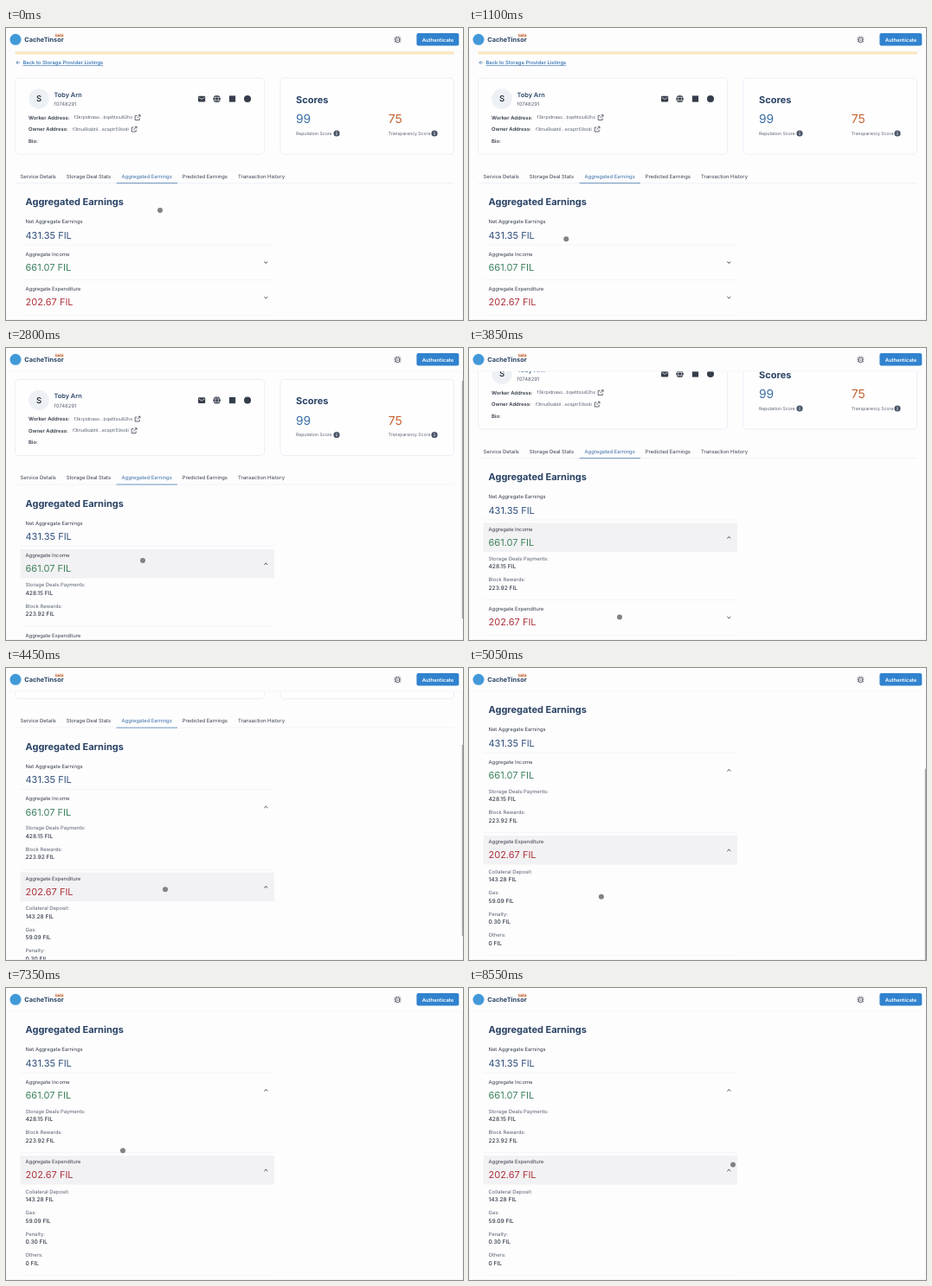
An HTML page for the animation above (8650 ms loop, 528x338 px).

```html
<!DOCTYPE html>
<html lang="en">
<head>
<meta charset="utf-8">
<title>Storage provider earnings</title>
<style>
  html, body { margin: 0; width: 100%; height: 100%; overflow: hidden; background: #fdfdfe; }
  svg { display: block; width: 528px; height: 338px; font-family: Inter, sans-serif; text-rendering: geometricPrecision; }
</style>
</head>
<body>
<svg id="stage" viewBox="0 0 528 338"></svg>
<script>
const LOOP = 8650;
const BG = '#fdfdfe', NAVY = '#2a4365', INK = '#363d4a', GREY = '#586070', BLUE = '#3a6ea5', LINE = '#e8ebf0';

// y is the optical middle of the line of text
const text = (x, y, size, fill, str, weight = 400, extra = '') =>
  `<text x="${x}" y="${y + size * 0.36}" font-size="${size}" fill="${fill}" font-weight="${weight}" ${extra}>${str}</text>`;
const rect = (x, y, w, h, fill, extra = '') =>
  `<rect x="${x}" y="${y}" width="${w}" height="${h}" fill="${fill}" ${extra}/>`;
const stroke = (d, color, width = 0.8, extra = '') =>
  `<path d="${d}" fill="none" stroke="${color}" stroke-width="${width}" ${extra}/>`;
const circle = (x, y, r, fill, extra = '') => `<circle cx="${x}" cy="${y}" r="${r}" fill="${fill}" ${extra}/>`;

const divider = y => stroke(`M16.5 ${y}H309.5`, LINE, 0.5);
const card = (x, w) => rect(x, 58, w, 88, '#fefeff', 'rx="4.4" stroke="#dfe4ee" stroke-width=".6"');
const externalLink = (x, y) =>
  stroke(`M${x - 0.5} ${y - 2}h-2.3v5h5v-2.3M${x + 0.8} ${y - 2.8}h2.2v2.2M${x + 3} ${y - 2.8}l-3.6 3.6`, INK, 0.75);
const info = x => circle(x, 122, 3.6, '#4a5568') + rect(x - 0.4, 121.4, 0.8, 2.6, '#fff') + circle(x, 120.2, 0.5, '#fff');
const score = (x, value, color, label, iconX) =>
  text(x, 105.2, 13.9, color, value) + text(x, 122, 5.13, GREY, label) + info(iconX);
const row = (id, y, label, amount, color) => `
  ${rect(16.5, y, 293.5, 33.5, '#f2f1f3', `id="${id}Hover"`)}
  ${text(22.5, y + 7, 5.87, INK, label)}
  ${text(22.5, y + 22.5, 11, color, amount)}
  <g id="${id}Chevron">${stroke('M-1.9 -.9L0 .9L1.9 -.9', INK, 1)}</g>`;
const details = (id, y, items) => `<g id="${id}Details">` + items.map(([label, amount], i) =>
  text(22.5, y + i * 24.5, 5.87, GREY, label) + text(22.5, y + 9.5 + i * 24.5, 6.6, INK, amount, 500)).join('') + '</g>';

const tabs = [[16.5, 'Service Details'], [69.7, 'Storage Deal Stats'], [133.5, 'Aggregated Earnings'],
  [203.7, 'Predicted Earnings'], [268, 'Transaction History']];

const profile = `
  ${rect(10.6, 24, 507, 6.5, '#fce6bd')}
  ${stroke('M16.3 40H11.8M13.8 38L11.8 40L13.8 42', BLUE, 0.7)}
  ${text(19.5, 40, 5.87, '#2b6cb0', 'Back to Storage Provider Listings', 500, 'text-decoration="underline"')}
  ${card(10.6, 288)}${card(317, 200.5)}
  ${circle(38, 82, 11.7, '#edf0f4')}${text(38, 82, 9.5, '#1a202c', 'S', 500, 'text-anchor="middle"')}
  ${text(55.5, 77, 7.33, NAVY, 'Toby Arn', 600)}
  ${text(55.5, 88, 5.87, GREY, 'f0748291')}
  ${text(26, 103.5, 5.87, INK, 'Worker Address:', 600)}
  ${text(78.5, 103.5, 5.2, GREY, 'f3krpidnaao...bqelttsiu82hx')}${externalLink(152, 103.5)}
  ${text(26, 117, 5.87, INK, 'Owner Address:', 600)}
  ${text(77, 117, 5.2, GREY, 'f3tnu6kabtil...ecaptr59oidi')}${externalLink(148, 117)}
  ${text(26, 130.5, 5.87, INK, 'Bio:', 600)}
  ${rect(222, 78.8, 8.2, 6.6, INK, 'rx=".8"')}${stroke('M222.7 80.2L226.1 82.5L229.5 80.2', '#fff', 0.7)}
  ${circle(243.6, 82, 4.3, INK)}
  ${stroke('M239.3 80.5h8.6M239.3 83.5h8.6M243.6 77.7c-2.6 2.4-2.6 6.2 0 8.6c2.6-2.4 2.6-6.2 0-8.6', '#fff', 0.5)}
  ${rect(257.9, 78.4, 7.2, 7.2, INK)}
  ${circle(279, 82, 4, INK)}
  ${text(335, 83, 11, NAVY, 'Scores', 650)}
  ${score(335, '99', BLUE, 'Reputation Score', 382)}
  ${score(441.7, '75', '#c4622f', 'Transparency Score', 495)}
  ${stroke('M10.6 179.5H517.5', LINE, 0.6)}
  ${tabs.map(([x, label], i) => text(x, 171.5, 5.87, i === 2 ? BLUE : INK, label)).join('')}
  ${stroke('M127.7 179.5H198', BLUE, 0.7)}`;

const earnings = `
  ${text(22.5, 201.3, 11, NAVY, 'Aggregated Earnings', 650)}
  ${text(22.5, 224.2, 5.87, INK, 'Net Aggregate Earnings')}
  ${text(22.5, 239.8, 11, '#33527d', '431.35 FIL')}
  ${divider(251)}
  ${row('income', 254.5, 'Aggregate Income', '661.07 FIL', '#40835f')}
  ${details('income', 295.5, [['Storage Deals Payments:', '428.15 FIL'], ['Block Rewards:', '223.92 FIL']])}
  <g id="lower">
    ${rect(0, 291, 528, 400, BG)}${divider(291.6)}
    ${row('spend', 295, 'Aggregate Expenditure', '202.67 FIL', '#b0343e')}
    ${details('spend', 336.5, [['Collateral Deposit:', '143.28 FIL'], ['Gas:', '59.09 FIL'],
      ['Penalty:', '0.30 FIL'], ['Others:', '0 FIL']])}
    <g id="tail">${rect(0, 331.5, 528, 300, BG)}${divider(332)}</g>
  </g>`;

const header = `
  ${rect(0, 0, 528, 27.2, BG)}${stroke('M0 26.9H528', '#eef0f4', 0.5)}
  ${circle(11, 13.3, 6.5, '#4299d8')}
  ${text(21.3, 13.5, 7.33, NAVY, 'CacheTinsor', 700)}
  ${rect(56.5, 6.3, 10.5, 5, '#fde3cf', 'rx=".7"')}
  ${text(61.7, 8.7, 4.2, '#9c4221', 'beta', 500, 'text-anchor="middle"')}
  ${rect(450.2, 10.8, 4.4, 6, 'none', `rx="2" stroke="${INK}" stroke-width=".8"`)}
  ${stroke('M450.2 11.6h-1.6M450.2 13.7h-1.8M450.2 15.8h-1.6M454.6 11.6h1.6M454.6 13.7h1.8M454.6 15.8h1.6' +
    'M450.5 9.4l1.1 1.3M454.3 9.4l-1.1 1.3M451.6 13h1.6M451.6 14.6h1.6', INK, 0.7)}
  ${rect(474.4, 5.9, 48.9, 14.5, '#3182ce', 'rx="2.2"')}
  ${text(499, 13.4, 5.87, '#fff', 'Authenticate', 600, 'text-anchor="middle"')}`;

document.getElementById('stage').innerHTML = `
  ${rect(0, 0, 528, 338, BG)}
  <g id="page">${profile}${earnings}</g>
  ${header}
  ${stroke('M.3 27V337.6H527.6V27', '#eceef2', 0.6)}
  ${rect(526.8, 0, 1.2, 0, '#a2a2a6', 'id="thumb" rx=".6"')}
  ${circle(0, 0, 3, '#828286', 'id="pointer"')}`;

const $ = id => document.getElementById(id);
const move = (id, x, y, more = '') => $(id).setAttribute('transform', `translate(${x} ${y})${more}`);
const ease = u => u * u * (3 - 2 * u);
const ramp = (t, start, end) => ease(Math.min(1, Math.max(0, (t - start) / (end - start))));

// time, x, y
const pointerPath = [
  [50, 178, 211], [900, 112, 239], [1000, 112, 242], [1800, 118, 291], [2050, 141, 277], [2400, 141, 277],
  [2800, 158, 246], [3000, 163, 241], [3650, 174, 311.5], [3950, 174, 311.5], [4450, 184, 256.3],
  [4700, 184, 251], [5550, 100, 288], [6150, 58, 300.3], [6550, 96, 170], [6950, 97, 168],
  [7800, 180, 212], [8500, 305, 204.5]
];

function pointerAt(t) {
  const i = pointerPath.findIndex(p => p[0] > t);
  if (i < 0) return pointerPath.at(-1).slice(1);
  if (i === 0) return pointerPath[0].slice(1);
  const [a, b] = [pointerPath[i - 1], pointerPath[i]];
  const u = ramp(t, a[0], b[0]);
  return [a[1] + (b[1] - a[1]) * u, a[2] + (b[2] - a[2]) * u];
}

function draw(t) {
  const open1 = ramp(t, 2300, 2520), open2 = ramp(t, 3900, 4140);
  const scroll = 52 * ramp(t, 2600, 3055) + 101 * ramp(t, 4150, 4695);
  const switched = ramp(t, 3900, 4060);

  move('page', 0, -scroll);
  move('lower', 0, 52 * open1);
  move('tail', 0, 101 * open2);
  move('incomeChevron', 300.3, 271.4, `rotate(${-180 * open1})`);
  move('spendChevron', 300.3, 312, `rotate(${-180 * open2})`);
  $('incomeDetails').setAttribute('opacity', open1);
  $('spendDetails').setAttribute('opacity', open2);
  $('incomeHover').setAttribute('opacity', ramp(t, 2260, 2440) * (1 - switched));
  $('spendHover').setAttribute('opacity', switched);

  const scale = 338 / (363 + 52 * open1 + 101 * open2);
  const shown = ramp(t, 2600, 2650) - ramp(t, 3450, 3650) + ramp(t, 4150, 4200) - ramp(t, 5350, 5550);
  $('thumb').setAttribute('y', (25 + scroll) * scale);
  $('thumb').setAttribute('height', 338 * scale);
  $('thumb').setAttribute('opacity', shown);

  move('pointer', ...pointerAt(t));
}

function tick() {
  draw(performance.now() % LOOP);
  requestAnimationFrame(tick);
}
tick();
</script>
</body>
</html>
```
